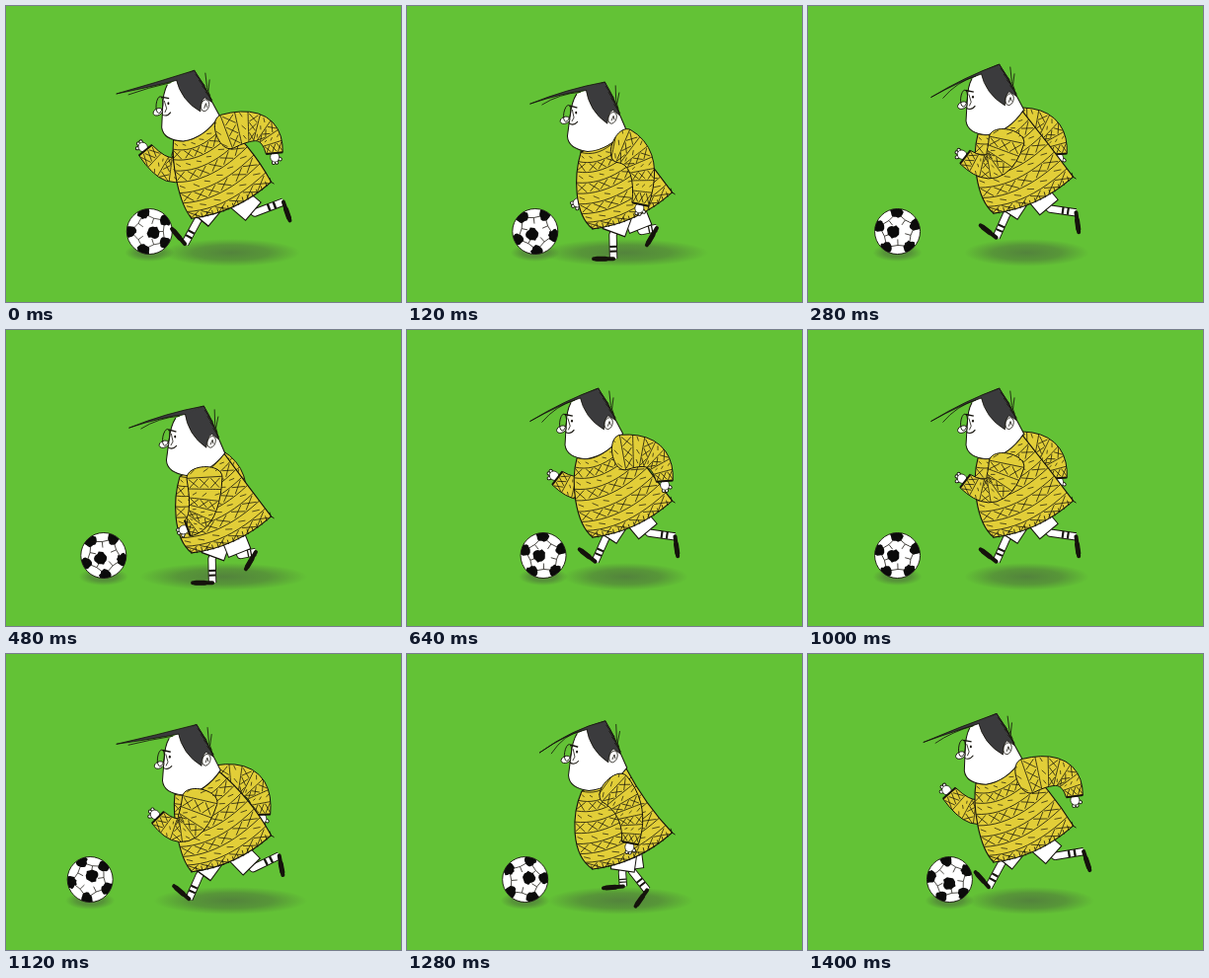
Recreate the animation shown at these times as an HTML page with a canvas. Size 400 px wide and 300 px high, loop 1440 ms.

```html
<!DOCTYPE html>
<html lang="en">
<head>
<meta charset="utf-8">
<title>Football run</title>
<style>
html, body { margin: 0; width: 100%; height: 100%; overflow: hidden; background: #63c236; }
canvas { display: block; }
</style>
</head>
<body>
<canvas id="stage" width="400" height="300"></canvas>
<script>
const c = document.getElementById('stage').getContext('2d');
const LOOP = 1440, TICK = 40;
const GRASS = '#63c236', INK = '#15130c', WOOL = '#e2ce38', HAIR = '#3b3b3d';

// Cosine of an angle in degrees, highest at peak.
const swing = (angle, peak = 0) => Math.cos((angle - peak) * Math.PI / 180);
// Seeded noise in -1..1.
const noise = n => { const x = Math.sin(n * 12.9898 + 4.1) * 43758.5453; return (x - Math.floor(x)) * 2 - 1; };

const add = (p, x, y) => [p[0] + x, p[1] + y];
const mix = (a, b, t) => [a[0] + (b[0] - a[0]) * t, a[1] + (b[1] - a[1]) * t];
const quad = (a, b, d, t) => mix(mix(a, b, t), mix(b, d, t), t);
const cubic = (a, b, d, e, t) => mix(quad(a, b, d, t), quad(b, d, e, t), t);
const polar = (r, a) => [r * Math.cos(a), r * Math.sin(a)];
const steps = n => Array.from({ length: n + 1 }, (_, i) => i / n);

function trace(points) {
  c.beginPath();
  points.forEach(p => c.lineTo(...p));
}
function stroke(width = 1, color = INK) {
  c.lineWidth = width;
  c.strokeStyle = color;
  c.stroke();
}
function line(points, width, color) {
  trace(points);
  stroke(width, color);
}
function paint(fill, width = 1) {
  c.fillStyle = fill;
  c.fill();
  if (width) stroke(width);
}
function oval(x, y, rx, ry, turn = 0) {
  c.beginPath();
  c.ellipse(x, y, rx, ry, turn, 0, 7);
}
function limb(points, width) {
  line(points, width + 1.8);
  line(points, width, '#fff');
}

function shadow(x, rx, ry) {
  c.save();
  c.translate(x, 250);
  c.scale(rx, ry);
  const g = c.createRadialGradient(0, 0, 0, 0, 0, 1);
  g.addColorStop(0, 'rgba(70,80,65,.55)');
  g.addColorStop(.55, 'rgba(70,85,60,.4)');
  g.addColorStop(1, 'rgba(70,90,55,0)');
  c.fillStyle = g;
  c.fillRect(-1, -1, 2, 2);
  c.restore();
}

function ball(x, y, turn) {
  const r = 23, sector = Math.PI * .4;
  c.save();
  c.translate(x, y);
  oval(0, 0, r, r);
  paint('#fff', 0);
  c.clip();
  c.rotate(turn);
  const patch = (p, size, a) => {
    trace(steps(19).map((v, i) => {
      const d = polar(size * (.9 + .14 * noise(i + a)), a + v * 2 * Math.PI);
      return add(p, ...d);
    }));
    paint('#0b0b0b', 0);
  };
  patch([4, 1], 7, 0);
  for (let i = 0; i < 5; i++) {
    const a = i * sector, b = a + sector / 2;
    line([polar(8, a), polar(14, a), polar(19, b)], .7);
    line([polar(14, a), polar(19, b - sector)], .7);
    patch(polar(20, b), 6.8, b);
  }
  c.restore();
  oval(x, y, r, r);
  stroke(.9);
}

// Knit bands over a surface at(across, along).
function knit(at, rows, cols) {
  const edge = steps(12);
  for (let i = 0; i < rows; i++) {
    line(edge.map(u => at(u, i / rows)), .8);
    for (let k = 0; k < cols; k++) {
      const n = i * cols + k, shift = .12 * noise(n);
      const spot = (u, v) => at((k + u + shift) / cols, (i + v) / rows);
      if (i % 2) {
        line([spot(.12, .1), spot(.9, .9)], .75);
        line([spot(.9, .1), spot(.12, .85)], .75);
      } else {
        line([spot(.2, .35), spot(.6, .6 + shift)], .7);
      }
    }
  }
}

function hand(wrist, angle) {
  c.save();
  c.translate(...wrist);
  c.rotate(angle);
  c.lineCap = 'round';
  [-1.1, -.25, .3].forEach(a => limb([[3, 0], add([4, 0], ...polar(6, a))], 2.2));
  c.lineCap = 'butt';
  oval(4, 0, 5, 4.5);
  paint('#fff', .7);
  c.restore();
}

// Arms and legs take the stride angle; 0 is the leg in front and its arm behind.
function arm(angle, bounce) {
  const s = [210 + 14 * swing(angle, 10), 138 + 8 * bounce - 8 * swing(angle)];
  const e = [225 + 43 * swing(angle), 160 - 40 * swing(angle) + 14 * swing(2 * angle, 130)];
  const w = [210 + 62 * swing(angle, -5), 174 + 30 * swing(2 * angle, 146)];
  const at = (u, v) => {
    const a = mix(s, e, v), b = mix(e, w, v), p = mix(a, b, v);
    const turn = Math.atan2(b[1] - a[1], b[0] - a[0]);
    return add(p, ...polar((u - .5) * (36 - 19 * v), turn + Math.PI / 2));
  };
  hand(w, Math.atan2(w[1] - e[1], w[0] - e[0]));

  const top = at(0, 0), low = at(1, 0), side = steps(10);
  const [bx, by] = polar(-15, Math.atan2(e[1] - s[1], e[0] - s[0]));
  trace([...side.map(v => at(0, v)), ...side.map(v => at(1, 1 - v))]);
  c.bezierCurveTo(...add(low, bx, by), ...add(top, bx, by), ...top);
  paint(WOOL);
  c.save();
  c.clip();
  knit((u, v) => at(u, v * 1.15 - .15), 8, 3);
  c.restore();
  line([at(0, 1), at(1, 1)], 2);
}

function leg(angle, seat) {
  const hip = add(seat, -8 * swing(angle), 0);
  const knee = [223 - 29 * swing(angle), 219 + 4 * swing(angle) + 11 * swing(2 * angle, 120)];
  const heel = [231 - 50 * swing(angle, -4), 230 + 22 * swing(angle, 15) + 12 * swing(2 * angle, 148)];
  const tilt = (30 + 80 * swing(angle, 172)) * Math.PI / 180;
  const toe = add(heel, -20 * Math.cos(tilt), 20 * Math.sin(tilt));
  const sock = v => mix(knee, heel, v);

  limb([mix(hip, knee, .7), knee, heel], 6.5);
  line([hip, mix(hip, knee, .94)], 25);
  line([hip, mix(hip, knee, .9)], 23, '#fff');
  [.45, .65].forEach(v => line([sock(v), sock(v + .08)], 7));
  c.lineCap = 'round';
  line([heel, toe], 4);
  line([mix(heel, toe, .4), mix(heel, toe, .85)], 5);
  c.lineCap = 'butt';
}

function torso(ear, hemL, hemR, reach) {
  const chest = add(ear, -32, 35), nape = add(ear, 13, 12);
  const bulge = 1 + 5 * reach;
  const back = add(mix(nape, hemR, .5), bulge, -bulge);
  const hem = add(mix(hemL, hemR, .5), 5, 13);
  const belly = add(hemL, -18 + 5 * reach, -15);
  const breast = add(chest, -6 + 4 * reach, 23);

  c.beginPath();
  c.moveTo(...chest);
  c.lineTo(...nape);
  c.quadraticCurveTo(...back, ...hemR);
  c.quadraticCurveTo(...hem, ...hemL);
  c.bezierCurveTo(...belly, ...breast, ...chest);
  paint(WOOL, 1.1);
  c.save();
  c.clip();
  knit((u, v) => {
    const p = mix(cubic(chest, breast, belly, hemL, v), quad(nape, back, hemR, v), u);
    return add(p, 0, 36 * u * (1 - u));
  }, 8, 6);
  c.restore();
  steps(16).forEach((v, i) => {
    const p = quad(hemR, hem, hemL, v);
    line([add(p, 0, 1), add(p, -1.5, -4 + noise(i))], .8);
  });
  line([hemR, add(hemR, 3, 2)], 1);
}

function head(ear, tilt, tip, bend) {
  c.save();
  c.translate(...ear);
  c.rotate(tilt);

  c.beginPath();
  c.moveTo(-37, -23);
  c.quadraticCurveTo(-42, -15, -43, 0);
  c.lineTo(-45, 20);
  c.quadraticCurveTo(-44, 33, -24, 35);
  c.quadraticCurveTo(-2, 33, 14, 11);
  c.lineTo(6, -6);
  c.lineTo(-9, -36);
  paint('#fff');

  c.beginPath();
  c.moveTo(-28, -29);
  c.lineTo(-9, -36);
  c.quadraticCurveTo(2, -20, 7, -3);
  c.lineTo(0, -8);
  c.quadraticCurveTo(-5, -4, -5, 6);
  c.quadraticCurveTo(-24, -6, -28, -29);
  paint(HAIR, .8);
  for (let i = 0; i < 4; i++) {
    line([[-8 + i * 3, -32 + i * 6], [1 + i * 2 + noise(i), -20 + i * 5]], .8);
  }
  line([[2, -33], [3, -18], [7, -4]], .8);
  line([[6, -26], [4, -14]], .8);

  oval(0, 0, 4, 6, .3);
  paint('#fff', .8);
  line([[-1, 3], [1, -2], [2, 2]], .8);

  oval(-48, 4, 5, 3.4, -.4);
  paint('#fff', .9);
  oval(-46, -3, 3.4, 8.5, .15);
  stroke(.9);
  line([[-41, -7], [-39, 1], [-41, 5]], .8);
  line([[-44, -11], [-36, -9]], 1.4);
  oval(-37, -4, 1, 1.4);
  paint(INK, 0);
  c.beginPath();
  c.moveTo(-44, 7);
  c.quadraticCurveTo(-39, 10, -35, 5);
  stroke(1);
  c.restore();

  const place = (x, y) => {
    const r = Math.hypot(x, y);
    return add(ear, ...polar(r, Math.atan2(y, x) + tilt));
  };
  const top = place(-9, -36), low = place(-27, -27);
  const middle = add(mix(tip, top, .5), 0, bend);
  c.beginPath();
  c.moveTo(...top);
  c.quadraticCurveTo(...middle, ...tip);
  c.quadraticCurveTo(...add(middle, -4, 4), ...low);
  paint(HAIR, .8);
  c.beginPath();
  c.moveTo(...place(-33, -25));
  c.quadraticCurveTo(...add(middle, -8, 5), ...add(tip, 12, 1));
  stroke(.8);
}

// One step lasts 360 ms, so time doubles as the step angle in degrees.
function draw(t) {
  const stride = t / 2;
  const bounce = swing(t, 110), reach = swing(t, 15), lag = swing(t, 200);
  const ear = [205.5 + 4 * swing(t, 170), 104 + 9.5 * bounce];
  const tip = [122.5 + 11.5 * lag, ear[1] - 9 + 8 * swing(t, 250)];
  const hemL = [188, 218 + 8 * bounce], hemR = [268.5, 181 + 8 * bounce];
  const seat = add(mix(hemL, hemR, .5), -5, -5);
  const ballX = 114.3 + 31 * swing(stride);

  c.fillStyle = GRASS;
  c.fillRect(0, 0, 400, 300);
  c.lineJoin = 'round';

  shadow(222 + 6 * reach, 74 + 11 * bounce, 14);
  shadow(ballX, 25, 9);
  ball(ballX, 228.5, -stride * Math.PI / 45);
  c.save();
  c.translate(-7, -3);
  arm(stride + 180, bounce);
  c.restore();
  leg(stride + 180, seat);
  leg(stride, seat);
  torso(ear, hemL, hemR, reach);
  head(ear, .05 * swing(t, 150) - .01, tip, -3.5 - 4.5 * lag);
  arm(stride, bounce);
}

function frame() {
  const t = performance.now() % LOOP;
  draw(Math.floor(t / TICK) * TICK);
  requestAnimationFrame(frame);
}
frame();
</script>
</body>
</html>
```
